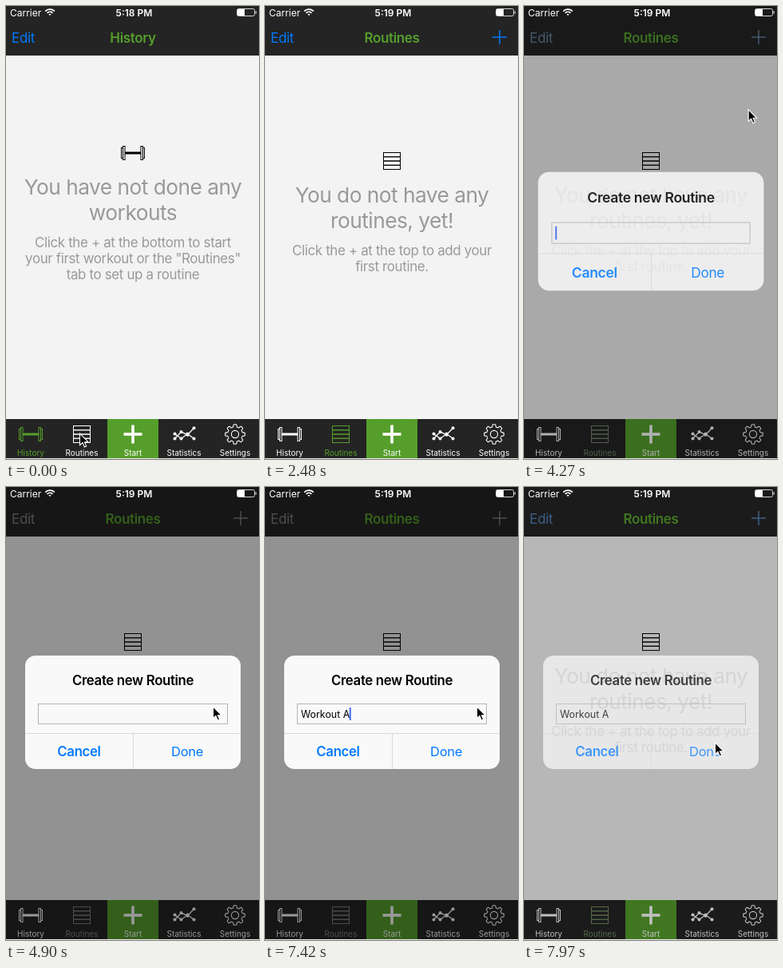
Recreate the animation shown at these times as an HTML page with a canvas. Size 317 by 567 pixels, loop 8000 ms.

```html
<!DOCTYPE html>
<html lang="en">
<head>
<meta charset="utf-8">
<title>Create a routine</title>
<style>
html, body { margin: 0; width: 100%; height: 100%; overflow: hidden; background: #242424; }
canvas { display: block; width: 317px; height: 567px; }
</style>
</head>
<body>
<canvas id="stage"></canvas>
<script>
const W = 317, H = 567, LOOP = 8000, MID = 159;
const canvas = document.getElementById('stage');
const ctx = canvas.getContext('2d');
const ratio = window.devicePixelRatio || 1;
canvas.width = W * ratio;
canvas.height = H * ratio;

const BAR = '#242424', PAGE = '#f3f3f3', GREY = '#999999', WHITE = '#ffffff';
const GREEN = [85, 158, 43], BLUE = [0, 122, 255], INACTIVE = [128, 128, 128];
const rgb = c => `rgb(${c.map(Math.round).join(',')})`;
const lerp = (a, b, p) => a + (b - a) * p;
const mix = (a, b, p) => rgb(a.map((v, i) => lerp(v, b[i], p)));

// Smooth 0 to 1 between two times.
function ramp(t, from, to) {
  const u = Math.min(1, Math.max(0, (t - from) / (to - from)));
  return u * u * (3 - 2 * u);
}

function text(str, x, y, size, color, { weight = 400, align = 'center' } = {}) {
  ctx.font = `${weight} ${size}px Inter, "Open Sans", sans-serif`;
  ctx.letterSpacing = size > 16 ? '-0.02em' : '0px';
  ctx.textAlign = align;
  ctx.fillStyle = color;
  ctx.fillText(str, x, y);
}

function fill(x, y, w, h, color) {
  ctx.fillStyle = color;
  ctx.fillRect(x, y, w, h);
}

function box(x, y, w, h, color) {
  ctx.strokeStyle = color;
  ctx.lineWidth = 1;
  ctx.strokeRect(x, y, w, h);
}

function circle(x, y, r) {
  ctx.beginPath();
  ctx.arc(x, y, r, 0, Math.PI * 2);
}

function cross(x, y, size, width, color) {
  fill(x - size / 2, y - width / 2, size, width, color);
  fill(x - width / 2, y - size / 2, width, size, color);
}

function dumbbell(x, y, color) {
  fill(x - 10, y - 1.5, 20, 3, color);
  for (const side of [-1, 1]) {
    box(x + side * 10, y - 8.5, side * 2.5, 17, color);
    box(x + side * 12.5, y - 6.5, side * 2, 13, color);
  }
}

function rows(x, y, color) {
  const pitch = 5.25;
  for (let i = 0; i < 4; i++) box(x - 10.5, y + (i - 2) * pitch, 21, pitch, color);
}

// Two zigzags, one of them climbing.
function chart(x, y, color) {
  ctx.strokeStyle = ctx.fillStyle = color;
  ctx.lineWidth = 1.3;
  for (const climb of [0, 1]) {
    const points = [0, 1, 2, 3].map(i => {
      const swing = (i + climb) % 2 ? 3 : -3;
      return [x - 11.5 + 8 * i, y + 2.5 + swing - climb * i * 2.4];
    });
    ctx.beginPath();
    points.forEach(p => ctx.lineTo(...p));
    ctx.stroke();
    for (const p of points) {
      circle(...p, 2);
      ctx.fill();
    }
  }
}

function gear(x, y, color) {
  ctx.strokeStyle = color;
  ctx.lineWidth = 1.1;
  ctx.beginPath();
  for (let i = 0; i < 160; i++) {
    const a = i * Math.PI / 80;
    const r = 10.8 + 1.5 * Math.max(-1, Math.min(1, 2.5 * Math.cos(8 * a)));
    ctx.lineTo(x + r * Math.cos(a), y + r * Math.sin(a));
  }
  ctx.closePath();
  ctx.stroke();
  circle(x, y, 4.6);
  ctx.stroke();
}

function statusBar(t) {
  text('Carrier', 5, 13, 12, WHITE, { align: 'left' });
  text(t < 2480 ? '5:18 PM' : '5:19 PM', 160.5, 13, 12, WHITE, { weight: 600 });
  ctx.strokeStyle = WHITE;
  ctx.lineWidth = 1.7;
  for (const r of [1.3, 4.6, 7.9]) {
    ctx.beginPath();
    ctx.arc(55, 12, r, -Math.PI * .76, -Math.PI * .24);
    ctx.stroke();
  }
  ctx.strokeStyle = '#d5d5d5';
  ctx.lineWidth = 1;
  ctx.beginPath();
  ctx.roundRect(289.5, 3.5, 22, 9, 2);
  ctx.stroke();
  fill(290, 4, 9, 8, WHITE);
  fill(312.5, 6.5, 1.3, 3, '#d5d5d5');
}

function emptyPage(isHistory) {
  const heading = (s, y) => text(s, MID, y, 26.3, GREY);
  const hint = (s, y) => text(s, MID, y, 16.9, GREY);
  if (isHistory) {
    dumbbell(MID, 184, '#000');
    heading('You have not done any', 236);
    heading('workouts', 268);
    hint('Click the + at the bottom to start', 302);
    hint('your first workout or the "Routines"', 322);
    hint('tab to set up a routine', 342);
  } else {
    rows(MID, 194, '#000');
    heading('You do not have any', 246);
    heading('routines, yet!', 278);
    hint('Click the + at the top to add your', 312);
    hint('first routine.', 332);
  }
}

function navBar(isHistory, t, dim) {
  const tint = mix(BLUE, INACTIVE, dim);
  fill(0, 0, W, 62, BAR);
  text('Edit', 7, 46, 17, tint, { align: 'left' });
  text(isHistory ? 'History' : 'Routines', MID, 46, 17, rgb(GREEN), { weight: 600 });
  if (isHistory) return;
  ctx.globalAlpha = t >= 3940 && t < 4230 ? .55 : 1;
  cross(294, 39, 18, 1.5, tint);
  ctx.globalAlpha = 1;
}

function tabBar(isHistory, dim) {
  const selected = mix(GREEN, INACTIVE, dim);
  const tabs = [
    ['History', dumbbell, isHistory],
    ['Routines', rows, !isHistory],
    ['Start', (x, y, c) => cross(x, y, 23, 3.6, c)],
    ['Statistics', chart],
    ['Settings', gear]
  ];
  fill(0, 517, W, 50, BAR);
  fill(127, 517, 64, 50, rgb(GREEN));
  tabs.forEach(([label, icon, active], i) => {
    const x = 31 + 64 * i, color = active ? selected : WHITE;
    icon(x, 536, color);
    text(label, x, 562.5, 10, color);
  });
}

function typedText(t) {
  if (t < 5980) return '';
  if (t >= 6800) return 'Workout A';
  return 'Workout '.slice(0, 1 + Math.floor((t - 5980) / 87));
}

function caretOpacity(t) {
  if (t >= 5980) return 1 - ramp(t, 7800, 7840);
  return 1 - ramp(t, 4700, 4880) + ramp(t, 5170, 5300) - ramp(t, 5690, 5800);
}

function alertBox(t, shown) {
  if (shown <= 0) return;
  const scale = 1.2 - .2 * ramp(t, 4165, 4320);
  const opacity = shown * (1.5 - .5 * shown);
  ctx.save();
  ctx.globalAlpha = opacity;
  ctx.translate(MID, 282);
  ctx.scale(scale, scale);
  ctx.translate(-MID, -282);
  ctx.fillStyle = '#f9f9f9';
  ctx.beginPath();
  ctx.roundRect(24, 211, 270, 142, 13);
  ctx.fill();
  text('Create new Routine', MID, 247.5, 16.8, '#000', { weight: 600 });
  box(40.5, 271.5, 237, 25, '#b3b3b3');
  fill(24, 308, 270, 1, '#dadada');
  fill(MID, 308, 1, 45, '#dadada');
  text('Cancel', 91.5, 337, 16.8, rgb(BLUE), { weight: 600 });
  text('Done', 227, 337, 16.5, rgb(BLUE));

  const value = typedText(t);
  text(value, 45, 288.5, 12.4, '#000', { align: 'left' });
  const caretX = 44.5 + ctx.measureText(value).width;
  ctx.globalAlpha = opacity * caretOpacity(t);
  fill(caretX, 276, 2, 16, '#426bf2');
  ctx.restore();
}

function pointerAt(t) {
  let x = 92, y = 535;
  const move = (from, to, endX, endY) => {
    const p = ramp(t, from, to);
    x = lerp(x, endX, p);
    y = lerp(y, endY, p);
  };
  if (t < 1320) {
    move(800, 1320, 299, 354);
  } else {
    [x, y] = [316, 44];
    move(2830, 3200, 293, 47);
    move(4155, 4440, 259, 275);
    move(5170, 5300, 265, 275);
    move(7420, 7720, 239, 320);
  }
  return [x, y];
}

function pointer(t) {
  if (t >= 1320 && t < 2830) return;
  const [x, y] = pointerAt(t);
  ctx.save();
  ctx.translate(x + .5, y);
  const arrow = new Path2D('M0 0V14.5L3.4 11.5 5.8 17 8.2 16 5.9 10.7H10.5Z');
  ctx.fillStyle = '#000';
  ctx.strokeStyle = WHITE;
  ctx.lineWidth = 1.1;
  ctx.fill(arrow);
  ctx.stroke(arrow);
  ctx.restore();
}

function draw(t) {
  const isHistory = t < 340;
  const shown = ramp(t, 4165, 4320) - ramp(t, 7880, 8095);
  ctx.setTransform(ratio, 0, 0, ratio, 0, 0);
  fill(0, 0, W, H, PAGE);
  emptyPage(isHistory);
  navBar(isHistory, t, shown);
  tabBar(isHistory, shown);
  fill(0, 0, W, H, `rgba(0,0,0,${.4 * shown})`);
  fill(0, 566, W, 1, '#e6e6e6');
  statusBar(t);
  alertBox(t, shown);
  pointer(t);
}

const start = performance.now();
function frame() {
  draw((performance.now() - start) % LOOP);
  requestAnimationFrame(frame);
}
frame();
</script>
</body>
</html>
```
